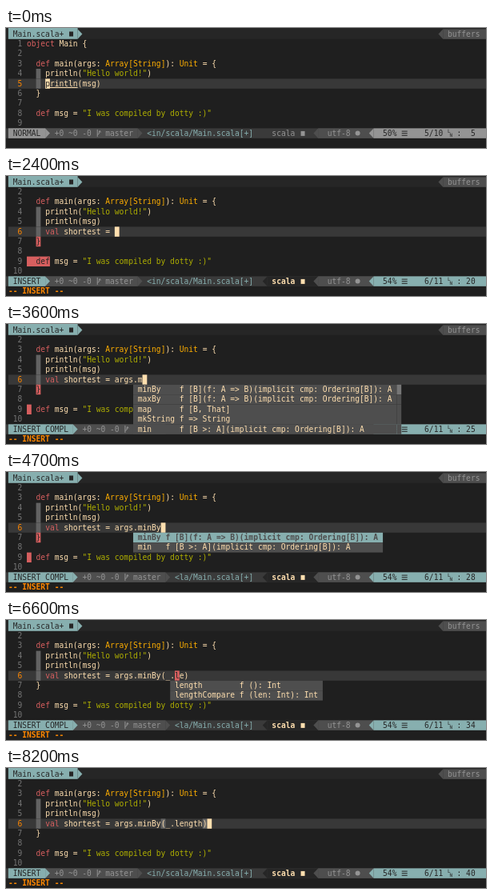
Animation, 600 px wide and 150 px high, one loop 8300 ms. Source, as an HTML page:

```html
<!DOCTYPE html>
<html lang="en">
<head>
<meta charset="utf-8">
<title>Editor session</title>
<style>
  html, body { margin: 0; width: 100%; height: 100%; overflow: hidden; background: #1f1f1f; }
  svg { display: block; width: 100vw; height: 100vh; }
  text { font: 9.6px "DejaVu Sans Mono", monospace; white-space: pre; }
  .b { font-weight: bold; }
</style>
</head>
<body>
<svg id="stage" viewBox="0 0 600 150"></svg>
<script>
const LOOP = 8300, TICK = 100;
const CW = 5.78, RH = 12.4, LEFT = 2.9, TOP = 1.4, GUTTER = 4;
const C = {
  bg: '#1f1f1f', line: '#383838', panel: '#4e4e4e', mid: '#3a3a3a', guide: '#626262',
  fg: '#ffdfaf', dim: '#949494', num: '#767676', teal: '#87afaf', red: '#d75f5f',
  green: '#afaf00', yellow: '#ffaf00', orange: '#ff8700', dark: '#262626'
};

// Typing: [start, ms per key, text]
const OPEN = 500, LEAVE = 7500, PAIR = 5000;
const TYPING = [
  [700, 90, 'val shortest = '], [2750, 110, 'args.'], [3550, 0, 'm'], [3900, 0, 'i'],
  [4200, 0, 'n'], [4650, 0, 'By'], [PAIR, 0, '('], [5200, 0, '_'], [5400, 0, '.'],
  [6150, 0, 'l'], [6550, 0, 'e'], [7050, 0, 'ngth']
];

const BY = '[B](f: A => B)(implicit cmp: Ordering[B]): A';
const MIN_BY = ['minBy', BY], MIN = ['min', '[B >: A](implicit cmp: Ordering[B]): A'];
const LAST = ['lastOption', '=> Option[A]'];
const MEMBERS = [MIN_BY, ['scan', '[B >: A, That]'], ['takeWhile', '(p: A => Boolean): Repr'],
  LAST, ['sum', '[B >: A](implicit num: Numeric[B]): B']];
const M_LIST = [MIN_BY, ['maxBy', BY], ['map', '[B, That]'], ['mkString', '=> String'], MIN];
const LENGTHS = [['length', '(): Int'], ['lengthCompare', '(len: Int): Int']];

// Completion menus: [from, to, code column, word width, items, selected, scrollbar]
const MENUS = [
  [3300, 3550, 24, 19, MEMBERS, -1, true],
  [3550, 3900, 24, 8, M_LIST, -1, true],
  [3900, 4650, 24, 5, [MIN_BY, MIN], -1, false],
  [4650, 5000, 24, 5, [MIN_BY, MIN], 0, false],
  [5500, 6150, 32, 19, MEMBERS, -1, true],
  [6150, 6550, 32, 13, [...LENGTHS, LAST], -1, false],
  [6550, 7050, 32, 13, LENGTHS, -1, false],
  [7050, LEAVE, 32, 13, LENGTHS, 0, false]
];

const esc = s => s.replace(/&/g, '&amp;').replace(/</g, '&lt;').replace(/>/g, '&gt;');
const X = col => +(LEFT + col * CW).toFixed(2);
const Y = row => +(TOP + row * RH).toFixed(2);
const during = (t, a, b) => t >= a && t < b;

let out = '';
const rect = (x, y, w, h, fill) => {
  out += `<rect x="${x}" y="${y}" width="${w}" height="${h}" fill="${fill}"/>`;
};
const cells = (col, row, n, fill) => rect(X(col), Y(row), n * CW, RH, fill);
const text = (col, row, s, fill, bold) => {
  out += `<text x="${X(col)}" y="${Y(row) + 9.2}" fill="${fill}"${bold ? ' class="b"' : ''}>${esc(s)}</text>`;
};
const arrow = (col, row, dir, fill) => {
  const a = X(dir > 0 ? col : col + 1), b = X(dir > 0 ? col + 1 : col), y = Y(row);
  out += `<path d="M${a} ${y}L${b} ${y + RH / 2}L${a} ${y + RH}z" fill="${fill}"/>`;
};
const toEdge = (col, row, fill) => rect(X(col), Y(row), 600 - X(col), RH, fill);

function typedAt(t) {
  let s = '';
  for (const [start, gap, str] of TYPING) {
    if (t < start) break;
    s += gap ? str.slice(0, Math.floor((t - start) / gap) + 1) : str;
  }
  return s;
}

const menuAt = t => MENUS.find(m => during(t, m[0], m[1]));

function tokenColor(s) {
  if (s[0] === '"') return C.green;
  if (/^(object|def|val)$/.test(s)) return C.red;
  return /^(Array|String|Unit|\[|\])$/.test(s) ? C.yellow : C.fg;
}

function code(row, src) {
  let col = GUTTER;
  for (const s of src.match(/"[^"]*"|\w+|\s+|[^\w\s"]/g) || []) {
    if (s.trim()) text(col, row, s, tokenColor(s));
    col += s.length;
  }
}

// A cell with its own background and a dark glyph
function block(col, row, ch, fill, ink = C.dark) {
  cells(GUTTER + col, row, ch.length, fill);
  text(GUTTER + col, row, ch, ink);
}

function tabLine() {
  rect(0, 0, 600, Y(1), C.dark);
  rect(X(0), 0, 15 * CW, Y(1), C.teal);
  arrow(15, 0, 1, C.teal);
  text(1, 0, 'Main.scala+', C.dark);
  rect(X(13) + 1, 4.5, 5, 6, C.dark);
  arrow(93, 0, -1, C.panel);
  toEdge(94, 0, C.panel);
  text(95, 0, 'buffers', C.dim);
}

function buffer(t) {
  const ins = t >= OPEN, typed = typedAt(t);
  const tail = t >= PAIR ? ')' : '';
  const lines = ['object Main {', '', '  def main(args: Array[String]): Unit = {',
    '    println("Hello world!")', '    println(msg)', '  }', '',
    '  def msg = "I was compiled by dotty :)"', '', '}'];
  if (ins) lines.splice(5, 0, '    ' + typed + tail);
  const first = ins ? 2 : 1, current = ins ? 6 : 5;

  for (let row = 1; row < 10; row++) {
    const n = row + first - 1, on = n === current;
    if (on) toEdge(0, row, C.line);
    text(0, row, String(n).padStart(3), on ? C.orange : C.num);
    if (n >= 4 && n <= current) cells(GUTTER + 2, row, 1, C.guide);
    code(row, lines[n - 1]);
  }

  if (!ins) {
    block(4, 5, 'p', C.fg);
    rect(X(GUTTER + 5), Y(6) - 1.8, 6 * CW, 1, C.fg);
    return;
  }
  if (during(t, 2200, PAIR)) {
    block(2, 6, '}', C.red);
    block(0, 8, t < 2800 ? '  def' : ' ', C.red);
  }
  const done = t >= LEAVE, misspelt = during(t, 6550, 7050);
  if (done) for (const [col, ch] of [[29, '('], [38, ')']]) block(col, 5, ch, C.guide, C.fg);
  if (misspelt) block(32, 5, 'l', C.red);
  else block(4 + typed.length + (done ? 1 : 0), 5, done ? ' ' : tail || ' ', C.fg);
}

function branch(col) {
  const x = X(col), y = Y(10);
  out += `<path d="M${x + 1.5} ${y + 1.5}v9M${x + 1.5} ${y + 8}q3 -1 3 -4m-1.3 1l1.3 -2l1.3 2" fill="none" stroke="${C.dim}"/>`;
}

function statusLine(t) {
  const r = 10, ins = t >= OPEN;
  const compl = !!menuAt(t) && !!menuAt(t - 150);
  const main = ins ? C.teal : C.dim, sh = compl ? 6 : 0;
  const mode = !ins ? 'NORMAL' : compl ? 'INSERT COMPL' : 'INSERT';

  rect(0, Y(r), 600, RH, C.mid);
  cells(0, r, 28 + sh, C.panel);
  arrow(28 + sh, r, 1, C.panel);
  cells(0, r, 8 + sh, main);
  arrow(8 + sh, r, 1, main);
  text(1, r, mode, C.dark);
  text(10 + sh, r, '+0 ~0 -0', C.dim);
  branch(19 + sh);
  text(21 + sh, r, 'master', C.dim);
  text(30 + sh, r, compl ? '<la/Main.scala[+]' : '<in/scala/Main.scala[+]', C.teal);

  if (ins) {
    arrow(55, r, -1, C.dark);
    cells(56, r, 11, C.dark);
  }
  const ink = ins ? C.fg : C.dim;
  text(57, r, 'scala', ink, ins);
  rect(X(63) + 1.5, Y(r) + 3.5, 5, 6, ink);
  arrow(66, r, -1, C.panel);
  cells(67, r, 12, C.panel);
  text(69, r, 'utf-8', C.dim);
  out += `<circle cx="${X(75) + 3.2}" cy="${Y(r) + 6.2}" r="3" fill="${C.dim}"/>`;

  arrow(78, r, -1, main);
  toEdge(79, r, main);
  text(81, r, ins ? '54%' : '50%', C.dark);
  for (let i = 0; i < 3; i++) rect(X(85) + .5, Y(r) + 3.2 + i * 2.6, 7, 1, C.dark);
  text(90, r, ins ? '6/11' : '5/10', C.dark);
  out += `<g style="font-size:6px" fill="${C.dark}"><text style="font-size:6px" x="${X(95)}" y="${Y(r) + 6}">L</text>` +
    `<text style="font-size:6px" x="${X(95) + 2.5}" y="${Y(r) + 11}">N</text></g>`;
  text(97, r, ':', C.dark);
  const late = t - TICK;
  const col = ins ? 5 + typedAt(late).length + (late >= LEAVE ? 1 : 0) : 5;
  text(99, r, String(col).padStart(2), C.dark);
  if (ins) text(0, 11, '-- INSERT --', C.orange, true);
}

function menu(m) {
  const [, , at, pad, items, sel, bar] = m;
  const col = GUTTER + at;
  const rows = items.map(([w, sig]) => w.padEnd(pad + 1) + 'f ' + sig);
  const n = Math.max(...rows.map(s => s.length)) + 2;
  rows.forEach((s, i) => {
    const on = i === sel;
    cells(col - 1, 6 + i, n, on ? C.teal : C.panel);
    text(col, 6 + i, s, on ? C.panel : C.fg, on);
  });
  if (bar) {
    const c = Math.min(col - 1 + n, 102);
    for (let i = 0; i < rows.length; i++) cells(c, 6 + i, 1, i ? C.panel : C.num);
  }
}

function draw(t) {
  out = '';
  rect(0, 0, 600, 150, C.bg);
  tabLine();
  buffer(t);
  statusLine(t);
  const m = menuAt(t);
  if (m) menu(m);
  stage.innerHTML = out;
}

const stage = document.getElementById('stage');
const begin = performance.now();
let shown = -1;
function tick() {
  const t = Math.floor(((performance.now() - begin) % LOOP) / TICK) * TICK;
  if (t !== shown) draw(shown = t);
  requestAnimationFrame(tick);
}
tick();
</script>
</body>
</html>
```
